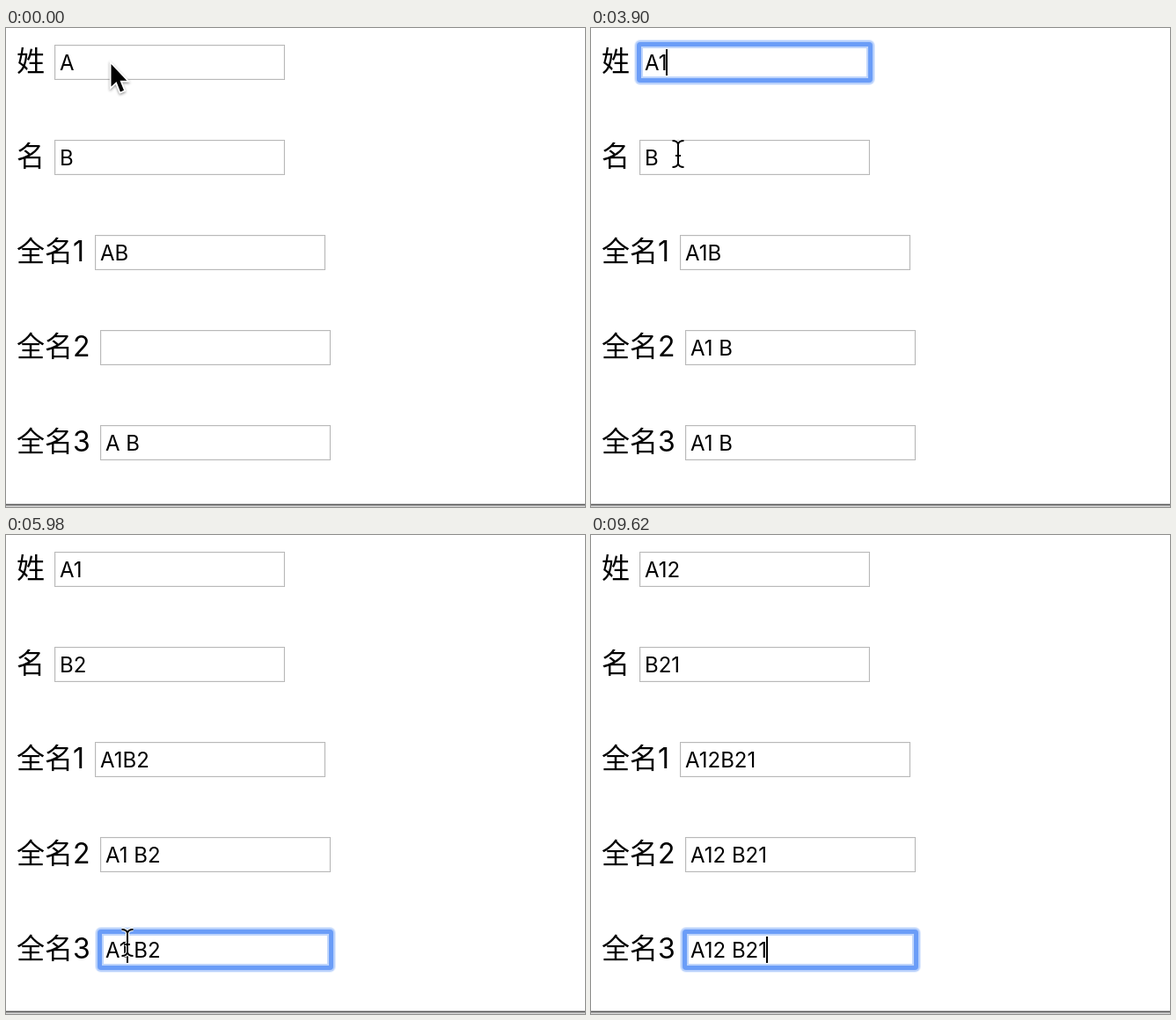
These frames come from a looping animation (658 by 544 pixels, 9.75 s). An HTML page with a canvas:

```html
<!DOCTYPE html>
<html lang="zh">
<head>
<meta charset="utf-8">
<style>
  html, body { margin: 0; width: 100%; height: 100%; overflow: hidden; background: #fff; }
  canvas { display: block; }
</style>
</head>
<body>
<canvas id="stage" width="658" height="544"></canvas>
<script>
const ctx = document.getElementById('stage').getContext('2d');
const LOOP = 9750, TICK = 130;
const FONTS = 'Inter, "Noto Sans CJK SC", "Noto Sans CJK", sans-serif';
const LABEL_FONT = '32px ' + FONTS, INPUT_FONT = '24px ' + FONTS;
const FIELD_W = 262, FIELD_H = 40;

const fields = [
  ['姓', 55], ['名', 55], ['全名1', 101], ['全名2', 107], ['全名3', 107]
].map(([label, x], i) => ({ label, x, y: 19 + 108 * i }));

// Every track is a list of [start time, ...state], held until the next entry.
const firstName = [[0, 'A'], [2860, 'A1'], [7280, 'A12']];
const lastName = [[0, 'B'], [4680, 'B2'], [8450, 'B21']];
const focus = [[0, -1], [1690, 0], [4290, 1], [5980, 4]];

// Caret: [start, character index, or -1 while hidden]
const caret = [
  [0, -1], [1690, 1], [2210, -1], [2730, 1], [2860, 2], [3380, -1], [3900, 2],
  [4290, 1], [4680, 2], [5200, -1], [5720, 2], [5980, 2], [6500, -1], [7020, 2],
  [7280, -1], [7800, 6], [8320, -1], [8450, 7], [8970, -1], [9490, 7]
];

// Pointer: [start, shape, x, y]
const pointer = [
  [0, drawArrow, 119.5, 41], [260, drawArrow, 112, 39], [390, drawArrow, 104, 37.5],
  [520, drawArrow, 101.5, 37], [2860, null],
  [3120, drawBeam, 104, 62], [3250, drawBeam, 103, 100], [3380, drawBeam, 100, 132],
  [3510, drawBeam, 99, 143], [4030, drawBeam, 98, 145], [4160, drawBeam, 98, 147],
  [4680, null],
  [5070, drawBeam, 108, 180], [5200, drawBeam, 128, 320], [5330, drawBeam, 138, 421],
  [5460, drawBeam, 138, 440], [5590, drawBeam, 138, 452], [5720, drawBeam, 138, 459],
  [5850, drawBeam, 138, 463], [7280, null],
  [7670, drawBeam, 163, 464], [7800, drawBeam, 184, 467], [7930, drawBeam, 198, 471],
  [8060, drawBeam, 203, 472], [8450, null],
  [9230, drawBeam, 250, 484], [9360, drawBeam, 338, 506], [9490, drawBeam, 432, 534],
  [9620, null]
];

function stateAt(track, time) {
  let state = track[0];
  for (const entry of track) if (entry[0] <= time) state = entry;
  return state.slice(1);
}

function drawText(text, x, y, font) {
  ctx.font = font;
  ctx.fillStyle = '#000';
  ctx.fillText(text, x, y);
}

function fillBox(field, outset, radius, color) {
  ctx.beginPath();
  ctx.roundRect(field.x - outset, field.y - outset,
    FIELD_W + 2 * outset, FIELD_H + 2 * outset, radius);
  ctx.fillStyle = color;
  ctx.fill();
}

function drawField(field, value, focused) {
  drawText(field.label, 12, field.y + 30, LABEL_FONT);
  if (focused) {
    fillBox(field, 6, 7, '#e6effe');
    fillBox(field, 5, 6, '#b9d1fb');
    fillBox(field, 3, 4, '#6b9df7');
    fillBox(field, -2, 0, '#bfd5fb');
    fillBox(field, -4, 0, '#fff');
  } else {
    fillBox(field, 0, 0, '#b9b9b9');
    fillBox(field, -1, 0, '#f3f3f3');
    fillBox(field, -2, 0, '#fff');
  }
  drawText(value, field.x + 6, field.y + 29, INPUT_FONT);
}

function drawCaret(field, value, index) {
  ctx.font = INPUT_FONT;
  const width = ctx.measureText(value.slice(0, index)).width;
  ctx.fillStyle = '#000';
  ctx.fillRect(Math.floor(field.x + 5 + width), field.y + 5, 2, 30);
}

function drawArrow() {
  const shape = new Path2D('M0 0V25.5L6 20L10.5 31.5L14.5 29.8L10 18.7H17.8Z');
  ctx.save();
  ctx.shadowColor = 'rgba(0,0,0,.4)';
  ctx.shadowBlur = 3;
  ctx.shadowOffsetY = 1.5;
  ctx.lineWidth = 3.5;
  ctx.strokeStyle = '#fff';
  ctx.stroke(shape);
  ctx.restore();
  ctx.fillStyle = '#000';
  ctx.fill(shape);
}

function drawBeam() {
  const shape = new Path2D(
    'M-6.5 -15Q-1 -15 0 -11Q1 -15 6.5 -15M0 -11V11' +
    'M-6.5 15Q-1 15 0 11Q1 15 6.5 15M-3 2H3');
  for (const [width, color] of [[4, '#fff'], [2, '#000']]) {
    ctx.lineWidth = width;
    ctx.strokeStyle = color;
    ctx.stroke(shape);
  }
}

function drawRule() {
  [[540, '#b5b5b5'], [541, '#565656'], [542, '#b8b8b8'], [543, '#d0d0d0']]
    .forEach(([y, color]) => {
      ctx.fillStyle = color;
      ctx.fillRect(0, y, 658, 1);
    });
}

function render(time) {
  const [first] = stateAt(firstName, time);
  const [last] = stateAt(lastName, time);
  const [active] = stateAt(focus, time);
  const [index] = stateAt(caret, time);
  const [shape, x, y] = stateAt(pointer, time);
  const full = first + ' ' + last;
  const values = [first, last, first + last, first === 'A' ? '' : full, full];

  ctx.fillStyle = '#fff';
  ctx.fillRect(0, 0, 658, 544);
  fields.forEach((field, i) => drawField(field, values[i], i === active));
  drawRule();
  if (index >= 0) drawCaret(fields[active], values[active], index);
  if (shape) {
    ctx.save();
    ctx.translate(x, y);
    shape();
    ctx.restore();
  }
}

const start = performance.now();
function loop() {
  const elapsed = (performance.now() - start) % LOOP;
  render(Math.floor(elapsed / TICK) * TICK);
  requestAnimationFrame(loop);
}
loop();
</script>
</body>
</html>
```
